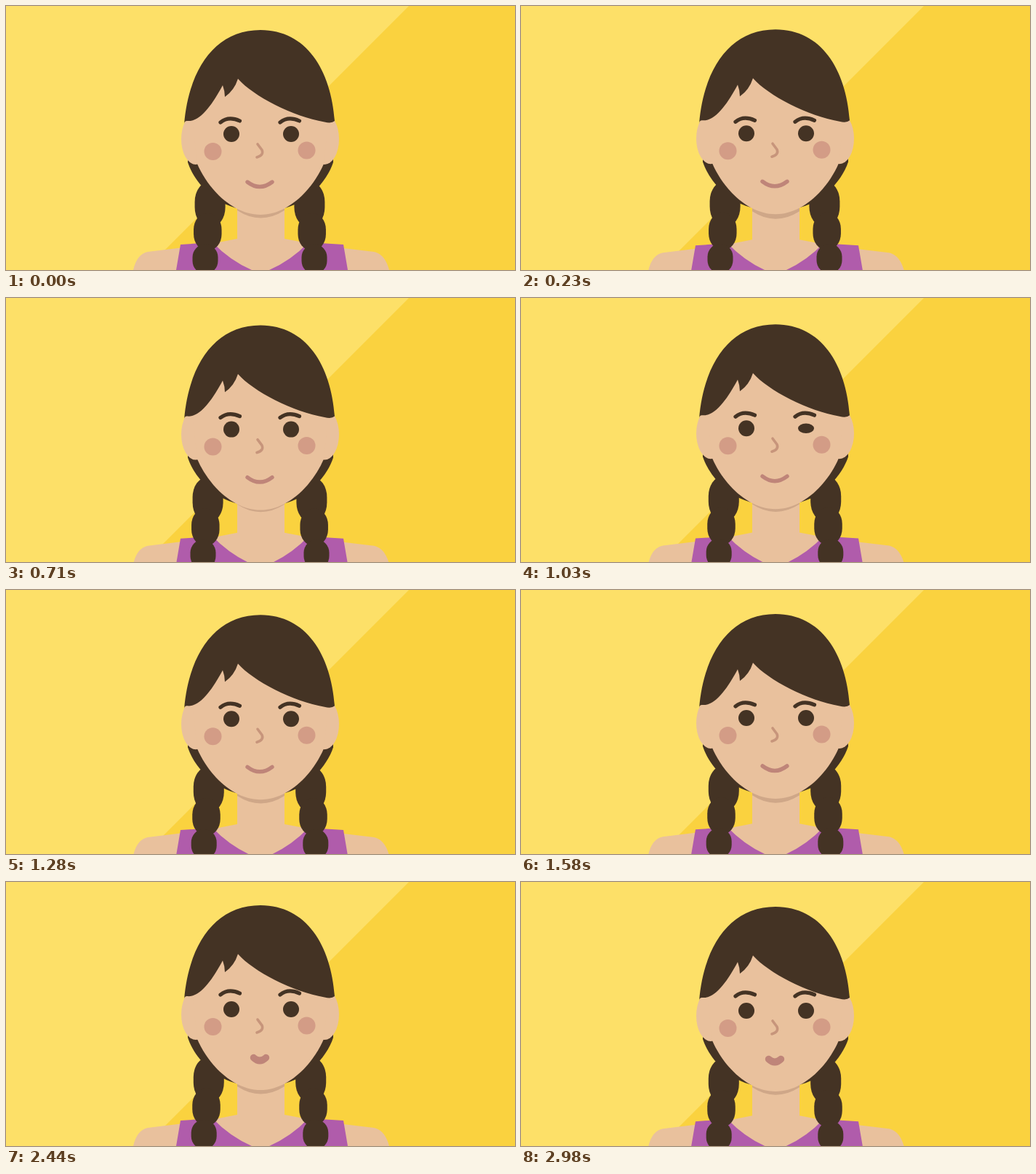
These frames come from a looping animation (700x363 px, 3.06 s). An HTML page:

```html
<!DOCTYPE html>
<html lang="en">
<head>
<meta charset="utf-8">
<title>Girl with braids</title>
<style>
  html, body { margin: 0; width: 100%; height: 100%; overflow: hidden; background: #fde068; }
  svg { display: block; }
  .hair { fill: #443324; }
  .skin { fill: #e9c19d; }
  .line { fill: none; stroke-linecap: round; stroke-linejoin: round; }
</style>
</head>
<body>
<svg width="700" height="363" viewBox="0 0 700 363">
  <path fill="#fde068" d="M0 0H700V363H0Z"/>
  <path fill="#fad23f" d="M554 0H700V363H191Z"/>

  <path id="back" class="hair" d="M250 150V215C258 240 285 272 322 279H378C415 272 442 240 450 215V150Z"/>

  <g id="body">
    <path class="skin" d="M318 260H383V320L412 325.5L464 333L506 338Q521 341 527 363V372H175V363Q180 341 195 338L240 332.5L290 325.5L318 320Z"/>
    <path fill="#b05cab" d="M240 328L284 325Q308 350 338 363H362Q392 350 416 325L464 328L470 363V372H232L234 363Z"/>
    <path fill="#cfa788" d="M318 260H383V281Q350 302 318 281Z"/>
  </g>

  <g id="braids">
    <ellipse cx="434" cy="368" rx="10" ry="3.5" fill="#7fd6d3"/>
  </g>

  <g id="head">
    <ellipse class="skin" cx="261" cy="183" rx="20" ry="35"/>
    <ellipse class="skin" cx="438" cy="183" rx="20" ry="35"/>
    <path class="skin" d="M255 140L263 217C278 252 312 287 350 287C388 287 422 252 437 217L445 140L350 70Z"/>
    <path class="hair" d="M245 163C251 88 287 33 350 33C413 33 447 88 452 158Q448 162 438 159.5C395 152 340 124 319 100Q314 116 301 125Q301 117 298 109C284 135 267 160 249 158Q245 158 245 163Z"/>
    <g fill="#d39c86">
      <circle cx="284.5" cy="200" r="12"/>
      <circle cx="413.5" cy="198.5" r="12"/>
    </g>
    <g class="hair">
      <circle cx="310" cy="176" r="11"/>
      <ellipse id="wink" cx="392" cy="176" rx="11"/>
    </g>
    <path id="brows" class="line" stroke="#443324" stroke-width="5.2" d="M295 160Q306 151 321.5 158M377 160Q388 151 403.5 158"/>
    <path class="line" stroke="#c7957b" stroke-width="3.6" d="M346 190L352 198Q355 205 345 208"/>
    <path id="mouth" class="line" stroke="#bf8579"/>
  </g>
</svg>
<script>
const LOOP = 3060;
const $ = id => document.getElementById(id);
const mix = (a, b, p) => a + (b - a) * p;

// Smooth step from 0 to 1 between two times
function ease(t, from, to) {
  const p = Math.min(1, Math.max(0, (t - from) / (to - from)));
  return (1 - Math.cos(Math.PI * p)) / 2;
}

// Smooth rise and fall around a centre time
const bump = (t, mid, half) => ease(t, mid - half, mid) - ease(t, mid, mid + half);

// Hop, dip and slow settling of the head
function headY(t) {
  const hop = -4.6 * bump(t, 430, 270);
  const dip = 4.6 * (ease(t, 430, 700) - ease(t, 700, 1600));
  const sway = -Math.sin(Math.PI * ease(t, 1700, 3000));
  return hop + dip + sway + ease(t, 2700, 3000);
}

const bodyY = t => 1.4 * (1 + Math.sin(2 * Math.PI * t / LOOP)) * ease(t, 0, 400);
const swing = t => 0.6 * ease(t, 300, 700) + 0.4 * bump(t, 710, 300);

function set(el, attrs) {
  for (const name in attrs) el.setAttribute(name, attrs[name]);
}

function shift(id, y) {
  set($(id), { transform: `translate(0 ${y})` });
}

// Three shrinking lobes on each side, drifting outwards
const lobes = [];
for (const side of [-1, 1]) {
  for (let i = 0; i < 3; i++) {
    const el = document.createElementNS($("braids").namespaceURI, "rect");
    const width = 42 - 3.5 * i, height = 62 - 11 * i;
    set(el, {
      class: "hair", width, height, rx: width * 0.47, ry: height * 0.44,
      x: 349 - width / 2, y: 242 + 43 * i
    });
    $("braids").append(el);
    lobes.push({ el, side, out: 68.4 + 3.3 * i });
  }
}

function draw(t) {
  const y = headY(t), pout = ease(t, 1560, 1780);
  for (const id of ["head", "back", "braids"]) shift(id, y);
  shift("body", bodyY(t));
  shift("brows", -4 * pout);
  for (const { el, side, out } of lobes) {
    set(el, { transform: `translate(${side * (out + 3 * swing(t))} 0)` });
  }
  set($("wink"), { ry: mix(11, 1.5, bump(t, 1090, 110)) });

  const w = mix(17, 8.5, pout), top = mix(242, 242.5, pout), depth = mix(13, 8, pout);
  set($("mouth"), {
    d: `M${349 - w} ${top}q${w} ${depth} ${2 * w} 0`,
    "stroke-width": mix(5.4, 9.4, pout)
  });
}

const start = performance.now();
function tick() {
  draw((performance.now() - start) % LOOP);
  requestAnimationFrame(tick);
}
tick();
</script>
</body>
</html>
```
